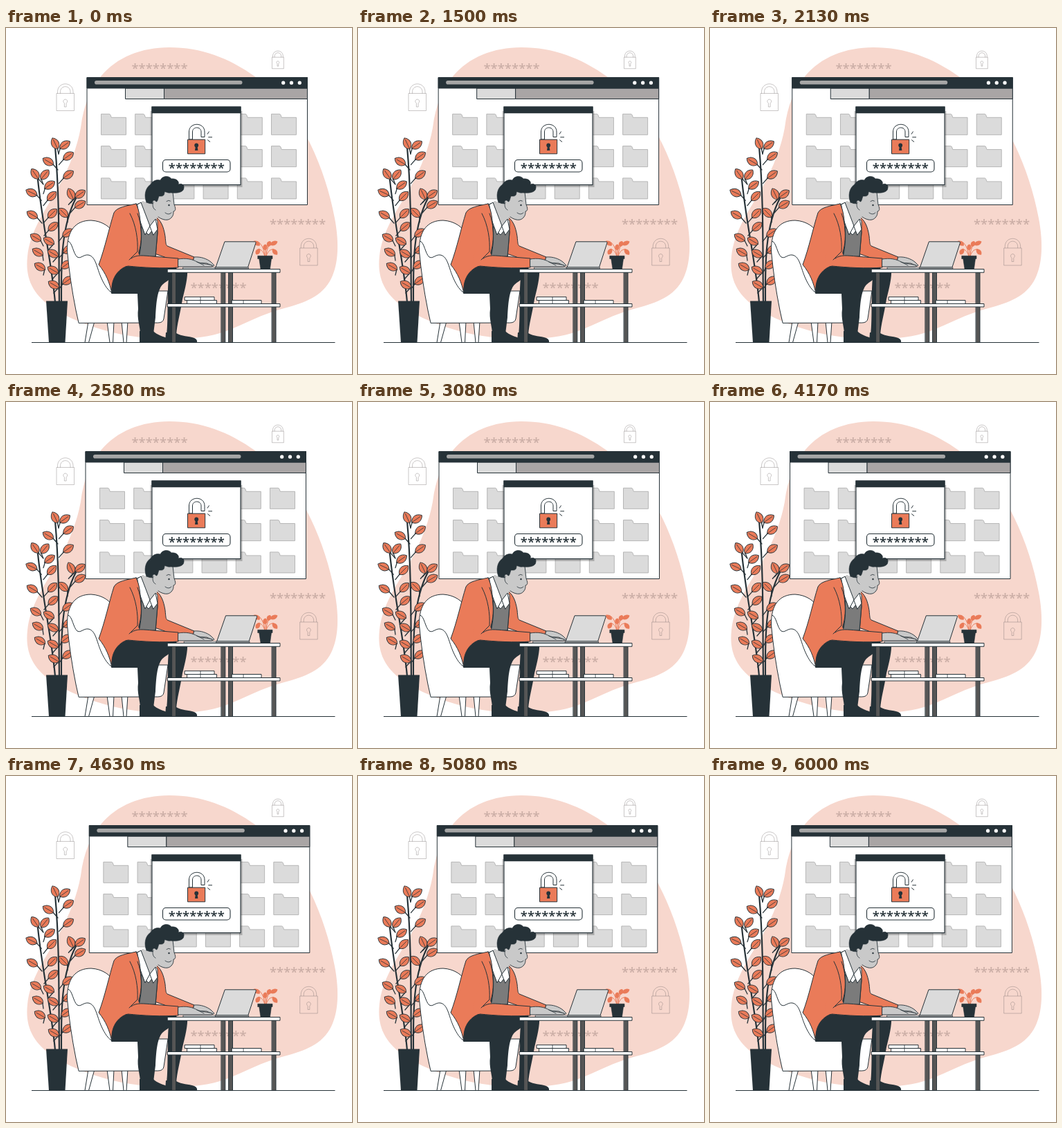
These frames come from a looping animation (500x500 px, 6040 ms). An HTML page with a canvas:

```html
<!DOCTYPE html>
<html lang="en">
<head>
<meta charset="utf-8">
<title>Password protection</title>
<style>
html, body { margin: 0; width: 100%; height: 100%; overflow: hidden; background: #fff; }
canvas { display: block; width: 500px; height: 500px; }
</style>
</head>
<body>
<canvas id="stage"></canvas>
<script>
const canvas = document.getElementById('stage');
const ratio = window.devicePixelRatio || 1;
canvas.width = canvas.height = 500 * ratio;
const c = canvas.getContext('2d');

const LOOP = 6040, DARK = '#263238', ORANGE = '#ea7b59', SKIN = '#c9c9c9',
      LIGHT = '#dbdbdb', MID = '#a6a6a6', PALE = '#f7d7cd', FAINT = 'rgba(110,100,100,.36)';

function paint(p, fill, line, w = 1) {
  if (fill) { c.fillStyle = fill; c.fill(p); }
  if (line) { c.strokeStyle = line; c.lineWidth = w; c.stroke(p); }
}
const shape = (d, fill, line, w) => paint(new Path2D(d), fill, line, w);

function box(x, y, w, h, fill, line, r = 0, lw = 1) {
  const p = new Path2D();
  p.roundRect(x, y, w, h, r);
  paint(p, fill, line, lw);
}
function dot(x, y, r, fill) {
  const p = new Path2D();
  p.arc(x, y, r, 0, Math.PI * 2);
  paint(p, fill);
}
function at(x, y, draw, deg = 0, size = 1) {
  c.save();
  c.translate(x, y);
  c.rotate(deg * Math.PI / 180);
  c.scale(size, size);
  draw();
  c.restore();
}
function stars(x, y, color) {
  c.font = '600 18.5px "Open Sans", sans-serif';
  c.textAlign = 'center';
  c.fillStyle = color;
  c.fillText('********', x, y + 9.8);
}

// Horizontal shake: ten linear steps over six seconds.
const STEPS = [0, -1, 2, -4, 4, -4, 4, -4, 2, -1, 0];
function shake(t) {
  if (t <= 0) return 0;
  const p = (t % 6000) / 600, i = Math.floor(p);
  return STEPS[i] + (STEPS[i + 1] - STEPS[i]) * (p - i);
}

function outlineLock(x, y, size) {
  at(x, y, () => {
    box(0, 14, 25.5, 25, null, FAINT, 0, 1 / size);
    shape('M1.5 14V12C1.5-3.6 24-3.6 24 12V14M5.5 14V12C5.5 1.6 20 1.6 20 12V14', null, FAINT, 1 / size);
    shape('M11.4 33.5V28.2C8.6 26 10 22.6 12.7 22.6S16.9 26 14.1 28.2V33.5Z', null, FAINT, 1 / size);
  }, 0, size);
}

function backdrop() {
  shape(`M236 28C282 28 322 43 361 71C398 97 424 133 440 168C456 201 468 238 475 275
    C482 312 480 342 470 362C457 388 432 397 402 405C370 413 345 428 318 438
    C282 452 225 452 180 445C140 439 90 422 60 399C36 380 28 358 31 330C35 292 58 262 77 228
    C92 200 103 172 108 144C112 112 122 88 137 70C160 42 196 28 236 28Z`, PALE);
  stars(222, 55.5, '#cbaea6');
  stars(421.5, 280, '#cbaea6');
  stars(307, 372, '#cbaea6');
  outlineLock(73, 80.5, 1);
  outlineLock(384.5, 33, .66);
  outlineLock(424.7, 304, 1);
  shape('M37 454.5H475.5', null, DARK);
}

function browser() {
  box(117, 71.5, 318.5, 184, '#fff', DARK);
  for (let row = 0; row < 3; row++)
    for (let col = 0; col < 6; col++)
      at(137.5 + col * 49.2, 124.3 + row * 46.3, () =>
        shape('M0 30V0H11.5Q13 0 13.5 1.5L14.8 5H36V30Z', LIGHT, '#b0b0b0', .9));
  box(172.5, 87, 56, 15.5, LIGHT, DARK);
  box(228.5, 87, 207, 15.5, '#a9a5a5', DARK);
  box(117, 71.5, 318.5, 15.5, DARK, DARK);
  box(128, 76, 213.5, 5.6, MID, null, 2.8);
  [400.7, 412.5, 424.3].forEach(x => dot(x, 79.2, 2.6, '#fff'));
}

function dialog() {
  box(208.5, 120, 133, 110, 'rgba(60,60,60,.3)');
  box(211, 114, 128, 112.6, '#fff', DARK, 0, 1.1);
  box(211, 114, 128, 8.6, DARK, DARK, 0, 1.1);
  shape('M264.500 161V150C264.500 135.700 287 135.700 287 150V157.500H282V150C282 142 269.500 142 269.500 150V161Z', '#fff', DARK);
  box(262.5, 161.2, 25.2, 20.6, ORANGE, DARK);
  dot(275.2, 169.5, 2.9, DARK);
  shape('M274 170H276.4L277.4 177H273Z', DARK);
  shape('M291 153.500L293.500 149.500M292.3 157.8H298M291.2 161.5L295 164.7', null, DARK);
  box(226.5, 190.5, 97.5, 17.5, '#fff', DARK, 4.5, 1.1);
  stars(275.3, 199.5, DARK);
}

const STEMS = [
  { d: 'M77 396C76 330 78 250 71 172', x: 76,
    leaves: [[71,167,-115],[85,169,-35],[61,193,-150],[90,185,-35],[90,212,-35],
             [89,296,-35],[90,320,-35],[87,342,-35],[89,365,-35]] },
  { d: 'M71 396C66 340 52 280 46 219', x: 54,
    leaves: [[42,211,-125],[56,212,-50],[37,238,-155],[63,227,-35],[66,243,-45],[38,270,-150],
             [67,268,-45],[43,303,-150],[68,287,-40],[62,308,-150],[46,324,-150],[68,326,-150],
             [49,345,-150],[68,350,-150],[69,371,-150]] },
  { d: 'M80 396C80 350 78 290 101 246', x: 89,
    leaves: [[94,240,-115],[107,240,-35],[107,255,-30],[83,267,-135]] }
];
function leaf(x, y, deg) {
  at(x, y, () => {
    shape('M-8.8 0C-5-7 4-7.500 9 0C4 7.500-5 7-8.8 0Z', ORANGE, DARK, .9);
    shape('M-8.8 0H6', null, DARK, .7);
  }, deg);
}
function tallPlant() {
  STEMS.forEach(s => {
    shape(s.d, null, DARK, 2.2);
    s.leaves.forEach(([x, y, deg]) => {
      const a = deg * Math.PI / 180, bx = x - 8 * Math.cos(a), by = y - 8 * Math.sin(a);
      const end = bx + Math.max(-7, Math.min(7, s.x - bx));
      shape(`M${bx} ${by}L${end} ${by + 8}`, null, DARK, 1.3);
    });
  });
  STEMS.forEach(s => s.leaves.forEach(l => leaf(...l)));
  shape('M58 394.5H89L85.5 454.5H62Z', DARK);
}

function chair() {
  shape('M119 424L114 454.5H119.5L128 424ZM146 424L150 454.5H154.5L156 424ZM167 424L170 454.5H174L176 424Z', '#fff', DARK);
  shape(`M105 426L101 408C95 378 91 350 88.5 322C88 292 101 278 123 278
    C140 279 152 288 158 300L170 380H234L228 420Q227 426 220 426Z`, '#fff', DARK);
  shape(`M90 308C96 310 97 326 103 331C108 334 112 327 119 328
    C130 330 131 347 138 362C143 373 148 380 154 383`, null, DARK);
}

function legs() {
  shape('M238 348H262C263 360 259 376 255 392C252 412 247 428 246 444H232C235 418 232 380 236 352Z', DARK);
  shape('M231 440L246 441C254 446 264 445 272 448Q277 450 276 454.5H230Z', DARK);
  shape(`M153 384C150 364 160 348 178 342L246 345C250 357 234 364 226 371
    C218 380 217 400 216 418L213 442H194C194 432 189 420 191 406L190 384Z`, DARK);
  shape('M193 438L212 437C218 444 228 446 235 449Q239 452 237 454.5H193Z', DARK);
}

function torso() {
  // Far arm, shirt and waistcoat sit behind the jacket front.
  shape('M214 272C224 276 228 288 230 301C231 312 231 313 233 315L272 331L270 340L246 337L215 326Z', ORANGE, DARK);
  shape('M189 255L199 251L219 279L219 296L216 332H192L196 286Z', '#fff', DARK);
  shape('M195 287L206 299L215 288L219 294L216 330L193 331Z', '#7b7b7b', DARK);
  shape('M197 250L218 256L218 276L211 285L207 288C201 277 195 265 194 256Z', SKIN);
  shape('M190 255L195 252L208 286L201 299L193 277ZM208 286L216 276L219 291L213 299Z', '#fff', DARK);
  shape(`M188 254C174 257 160 259 156 267C149 289 143 318 134 342C144 354 150 368 153 384
    C151 364 160 348 178 343L190 329C195 317 196 304 195 291C194 276 193 264 188 254Z`, ORANGE, DARK);
  shape('M190 268C197 286 197 306 193 327', null, DARK);
  shape(`M178 268C187 284 190 306 190 323L193 329C211 329 230 332 249 333L250 346
    C226 348 190 346 175 344C168 343 165 336 168 328L178 290`, ORANGE);
  shape('M179 268C188 285 191 306 190 323L178 335M181 333C188 327 200 329 212 330L249 333V346C226 348 198 346 176 344', null, DARK);
}

function head() {
  shape(`M212 249V262L217 273L223 275C229 279 236 278 239 274C242 271 242 268 242 265
    C246 264 245 260 243 256L241 235L222 236Z`, SKIN);
  shape(`M241 237L243 255C245 260 246 264 242 265C242 268 242 271 239 274
    C235 279 227 278 220 273`, null, DARK, .9);
  shape(`M203 252C199 243 201 231 209 226C213 219 220 219 223 220C226 213 236 213 239 218
    C246 217 251 222 249 226C254 224 258 227 257 231C257 238 246 239 238 238
    C233 239 231 236 229 237C229 244 225 243 221 243C219 249 219 251 217 251
    C214 247 211 250 212 254Q207 254 203 252Z`, DARK, DARK, .6);
  shape('M213 252C211 255 212 261 216 263', null, DARK, .8);
  dot(235.5, 256, 1.2, DARK);
  shape('M232 250.500Q235 248 237.500 250M230 267Q235 271 239 267', null, DARK, .8);
}

function hands() {
  shape('M272 331C282 330 291 334 296 338L301 343Q300 345 297 343L290 340L270 339Z', SKIN, DARK, .9);
  shape('M249 334C259 332 270 334 276 338C283 341 293 341 298 343Q300 345 296 345L278 345L249 345Z', SKIN, DARK, .9);
  shape('M276 338L286 343', null, DARK, .8);
}

function table() {
  [240, 311.3, 322, 384.5].forEach(x => box(x, 353, 5.5, 101.5, '#565656', DARK));
  box(233.5, 398.5, 162.5, 4.5, '#fff', DARK);
  box(262, 393.5, 42.5, 5, '#fff', DARK);
  box(258.5, 388.7, 42.5, 4.8, '#fff', DARK);
  box(326.5, 393.5, 42.5, 5, '#fff', DARK);
  shape('M281 389V398.5M343 393.5V398.5', null, DARK, .8);
  box(233.5, 348.5, 162.5, 4.8, '#fff', DARK);
}

function smallPlant() {
  shape('M374 330C373 320 370 314 366 310M376 330C376 320 380 312 385 309M374 330C372 323 369 320 366 320M376 330C378 322 383 319 387 320M375 330V318', null, ORANGE);
  [[362.5,311,35,11],[364,323,120,10],[374.5,317,-85,9],[380,312,-65,9],[387,311,-25,12],[388.5,323.5,50,11]]
    .forEach(([x, y, deg, len]) => at(x, y, () =>
      shape(`M${-len / 2} 0C-2-4.5 3-4 ${len / 2} 0C3 4-2 4.5 ${-len / 2} 0Z`, ORANGE), deg));
  shape('M364 329.3H385V333.5H383.5L381.5 348H368L365.8 333.5H364Z', DARK, DARK, .6);
}

function laptop() {
  shape('M256 346H303V348H256Z', '#fff', DARK, .7);
  shape('M303 346L316 308.8H359.5Q361.5 308.8 361 310.5L349.5 346Z', LIGHT, DARK);
  box(302, 345.6, 48.5, 2.4, MID, DARK, .8, .8);
}

const start = performance.now();
function frame() {
  const t = (performance.now() - start) % LOOP;
  c.setTransform(ratio, 0, 0, ratio, 0, 0);
  c.fillStyle = '#fff';
  c.fillRect(0, 0, 500, 500);
  c.lineJoin = 'miter';
  c.lineCap = 'butt';
  backdrop();
  at(shake(t - 980), 0, browser);
  dialog();
  c.lineJoin = c.lineCap = 'round';
  tallPlant();
  chair();
  legs();
  torso();
  head();
  table();
  smallPlant();
  at(shake(t), 0, laptop);
  hands();
  requestAnimationFrame(frame);
}
frame();
</script>
</body>
</html>
```
